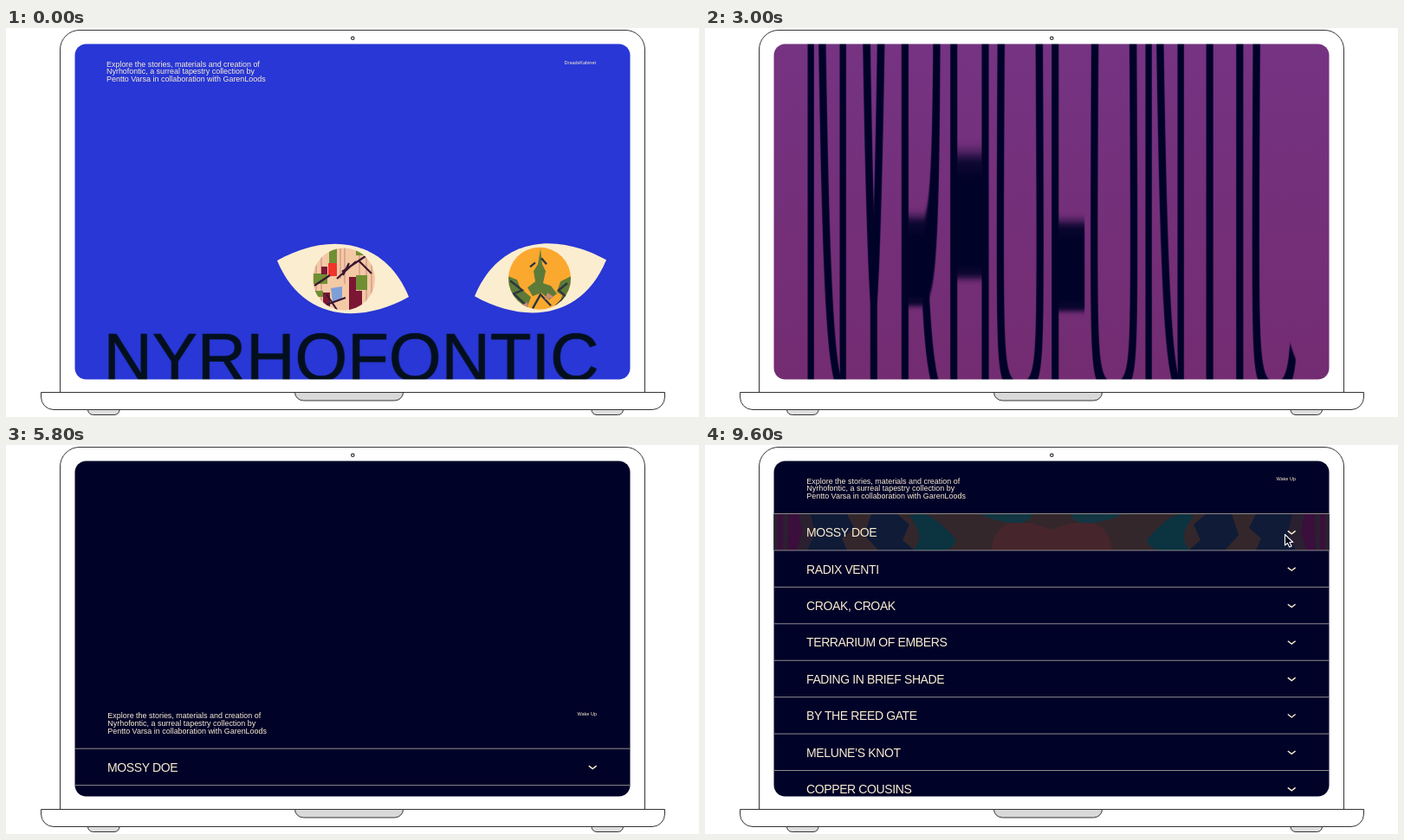
An HTML page with a canvas that plays this animation: 800x450 px, repeating every 9.7 s.

```html
<!DOCTYPE html>
<html lang="en">
<head>
<meta charset="utf-8">
<title>Nyrhofontic</title>
<style>
  html, body { margin: 0; width: 100%; height: 100%; overflow: hidden; background: #fff; }
  #stage { position: relative; width: 800px; height: 450px; overflow: hidden; }
  canvas { position: absolute; left: 79px; top: 18px; clip-path: inset(.5px round 13px); }
  svg { position: absolute; left: 0; top: 0; }
  text { font-family: "Liberation Sans", Arial, sans-serif; fill: #fbeed2; }
  .intro { font-size: 8.95px; }
  .tag { font-size: 5.5px; text-anchor: end; }
  .row text { font-size: 14px; letter-spacing: -.38px; }
  .row path { fill: none; stroke: #fbeed2; stroke-width: 1.4; }
  .rule { stroke: #8f8b8c; stroke-width: 1; }
  .frame { fill: none; stroke: #333; stroke-width: 1; }
</style>
</head>
<body>
<div id="stage">
  <canvas id="screen" width="642" height="389"></canvas>
  <svg width="800" height="450" viewBox="0 0 800 450">
    <defs>
      <clipPath id="view"><rect x="79.500" y="18.500" width="641" height="388" rx="13"/></clipPath>
      <clipPath id="lid"><path class="lid"/></clipPath>
      <clipPath id="iris"><circle cx="390" cy="290.5" r="36"/></clipPath>
    </defs>

    <g id="eyes">
      <g>
        <path class="lid" fill="#fbedd0"/>
        <g clip-path="url(#lid)"><g clip-path="url(#iris)">
          <rect x="350" y="250" width="80" height="80" fill="#f3c9a6"/>
          <path d="M358 250V330M364 250V330M386 250V290M391 250V296M408 250V330M416 250V330M422 250V330" stroke="#d59a86" stroke-width="1.4"/>
          <path d="M373 255h9v17h-9zM355 284h16v12h-16zM404 286h13v17h-13zM404 255h14v8h-14zM357 304h9v7h-9z" fill="#6f8f33"/>
          <path d="M372 272h10v15h-10z" fill="#f0352b"/>
          <path d="M396 288h8v38h-8zM404 304h7v20h-7zM364 276h7v9h-7zM366 306h8v20h-8z" fill="#7b1735"/>
          <path d="M375 301l13-2v14l-11 4z" fill="#7f9fd8"/>
          <path d="M356 298l18-12M382 290l22-20M388 282l33-22M396 272l-7 14M370 320l22-8M382 326l-12-18M408 270l14 14" stroke="#3a1730" stroke-width="2.2"/>
        </g></g>
      </g>
      <g transform="matrix(-1 0 0 1 1006 -.7)">
        <path class="lid" fill="#fbedd0"/>
        <g clip-path="url(#lid)"><g clip-path="url(#iris)">
          <rect x="350" y="250" width="80" height="80" fill="#fba82f"/>
          <path d="M389 256l3 18 5 8-2 12 9 7-6 10-10-4-9 8-9-7 7-9 9-3-3-14 4-8zM354 288l12 6 4 12-6 4 4 14-14 2zM426 288l-10 4-4 10-12 10 6 16 22-6z" fill="#5d7a38"/>
          <path d="M424 293l-14 11 10 4-13 12M358 296l10 8-8 7 13 13M377 322l12-13 9 16M382 274l6-7M395 272l6 5" fill="none" stroke="#2d3540" stroke-width="2.4"/>
          <path d="M373 312l8-5 3 8zM404 318l8 4-9 4z" fill="#c78a76"/>
        </g></g>
      </g>
    </g>

    <g id="head"></g>
    <g clip-path="url(#view)"><g id="list"></g></g>

    <g id="cursor">
      <path d="M0 0V12.5L3 10L5.2 14.6L7.6 13.5L5.4 9H9.2Z" fill="#05051a" stroke="#fff" stroke-width="1.1" stroke-linejoin="round"/>
    </g>

    <g class="frame">
      <path d="M62.500 421V25A22.500 22.500 0 0 1 85 2.500H715A22.500 22.500 0 0 1 737.500 25V421"/>
      <circle cx="400.300" cy="11.800" r="1.700" stroke-width="1.200"/>
      <path d="M40.500 421.500H760.500V427A14.500 14.500 0 0 1 746 441.500H55A14.500 14.500 0 0 1 40.500 427Z"/>
      <path d="M333.500 421.500H458.500A10 9.500 0 0 1 448.500 431H343.500A10 9.500 0 0 1 333.500 421.500Z" fill="#d9d9d9"/>
      <path id="foot" d="M94.500 441.500H131A6 6 0 0 1 125 447.500H100.500A6 6 0 0 1 94.500 441.500Z" fill="#dedede"/>
      <use href="#foot" x="581.500"/>
    </g>
  </svg>
</div>
<script>
const LOOP = 9700, W = 642, H = 389;
const $ = s => document.querySelector(s);
const clamp = (v, lo = 0, hi = 1) => Math.min(hi, Math.max(lo, v));
const span = (t, a, b) => clamp((t - a) / (b - a));
const smooth = p => p * p * (3 - 2 * p);
const mix = (a, b, p) => a + (b - a) * p;

// Rows are [time, ...values], blended linearly.
function sample(keys, t) {
  let i = 0;
  while (i < keys.length - 2 && t >= keys[i + 1][0]) i++;
  const a = keys[i], b = keys[i + 1], p = span(t, a[0], b[0]);
  return a.slice(1).map((v, j) => mix(v, b[j + 1], p));
}

// time, top colour, bottom colour, gradient length
const SKY = [
  [1000, 40, 55, 213, 40, 55, 213, 1],
  [2400, 71, 65, 200, 98, 57, 168, 1],
  [3600, 163, 37, 60, 132, 31, 58, 1],
  [4400, 21, 5, 45, 0, 2, 40, .66],
  [4700, 0, 2, 40, 0, 2, 40, .66]
];
const INK = [[0, 4, 15, 30], [1800, 0, 2, 40]];
// time, letter height seen at the top and bottom edge of the screen
const SPREAD = [[2400, -.5, 45.5], [3600, 38, 48.5], [4400, 51, 51.2]];

function makeCanvas(w, h) {
  const c = document.createElement('canvas');
  c.width = w;
  c.height = h;
  return c;
}

// The word, softened and enlarged vertically so it can be smeared row by row.
const PAD = 4, ROWS = 66, FINE = 16;
function makeWord() {
  const soft = makeCanvas(W * 4, ROWS * 4), s = soft.getContext('2d');
  s.scale(4, 4);
  s.filter = 'blur(1.2px)';
  s.font = '78px "Liberation Sans", Arial, sans-serif';
  s.fontKerning = 'none';
  s.lineJoin = 'round';
  s.lineWidth = .8;
  const y = PAD + 53.9;
  s.fillText('NYRHOFONTIC', 33.5, y);
  s.strokeText('NYRHOFONTIC', 33.5, y);
  const tall = makeCanvas(W * 2, ROWS * FINE), c = tall.getContext('2d');
  c.imageSmoothingQuality = 'high';
  c.drawImage(soft, 0, 0, tall.width, tall.height);
  return tall;
}

const word = makeWord();
const layer = makeCanvas(W, H), lc = layer.getContext('2d');
const ctx = $('#screen').getContext('2d');
const rgb = c => `rgb(${c.map(Math.round)})`;

// Returns a function from screen row to height inside the word.
function smear(t) {
  const p = span(t, 0, 2400), k = mix(.02, .94, p);
  const curve = q => Math.log(1 - k * q) / Math.log(1 - k);
  let a, b;
  if (p < 1) {
    const g = curve(mix(336, 10, p) / H);
    b = mix(53, 45.5, p);
    a = -b * g / (1 - g);
  } else {
    [a, b] = sample(SPREAD, t);
  }
  return y => mix(a, b, curve(y / H));
}

function drawScreen(t) {
  const c = sample(SKY, t), g = ctx.createLinearGradient(0, 0, 0, H * c[6]);
  g.addColorStop(0, rgb(c.slice(0, 3)));
  g.addColorStop(1, rgb(c.slice(3, 6)));
  ctx.fillStyle = g;
  ctx.fillRect(0, 0, W, H);
  if (t >= 4700) return;

  const at = smear(t);
  lc.globalCompositeOperation = 'source-over';
  lc.clearRect(0, 0, W, H);
  for (let y = 0; y < H; y++) {
    const u = at(y), sy = (u + PAD) * FINE;
    const sh = Math.max(1, (at(y + 1) - u) * FINE);
    if (sy < 0 || sy + sh > word.height) continue;
    lc.drawImage(word, 0, sy, word.width, sh, 0, y, W, 1);
  }
  lc.globalCompositeOperation = 'source-in';
  lc.fillStyle = rgb(sample(INK, t));
  lc.fillRect(0, 0, W, H);
  ctx.drawImage(layer, 0, 0);
}

// Leaf outline whose curves fall onto the line between its corners.
function lidPath(open) {
  const pt = (x, y) => `${x} ${mix(269 + (x - 313) * .276, y, open)}`;
  return `M313 269C${pt(372, 236)} ${pt(437, 243)} 465 311` +
         `C${pt(406, 344)} ${pt(341, 337)} 313 269Z`;
}

const INTRO = [
  'Explore the stories, materials and creation of',
  'Nyrhofontic, a surreal tapestry collection by',
  'Pentto Varsa in collaboration with GarenLoods'
];
const TITLES = [
  'MOSSY DOE', 'RADIX VENTI', 'CROAK, CROAK', 'TERRARIUM OF EMBERS',
  'FADING IN BRIEF SHADE', 'BY THE REED GATE', 'MELUNE’S KNOT', 'COPPER COUSINS'
];
const STEP = 42.43;

const header = (x, tag, tx, ty) =>
  INTRO.map((s, i) => `<text class="intro" x="${x}" y="${44.6 + i * 8.8}">${s}</text>`).join('') +
  `<text class="tag" x="${tx}" y="${ty}">${tag}</text>`;

const half = `
  <path d="M79 80H130V122H79Z" fill="#2a2030"/>
  <path d="M84 80h6v42h-6zM96 80h12l4 20-6 22h-11z" fill="#3a0f3c"/>
  <path d="M122 80h42l8 16-14 12 6 14h-46l9-20zM192 80h30l14 12-8 18 14 12h-42l-16-18z" fill="#101b37"/>
  <path d="M236 82q18-6 32 6t22 22q-2 10-16 12h-34q16-16-4-40z" fill="#0b3340"/>
  <path d="M330 122q4-30 26-32t44 8v24z" fill="#47252c"/>
  <path d="M318 80h60q-4 12-24 10t-36-10z" fill="#123742"/>`;

$('#head').innerHTML = header(116, 'DraadsKabinet', 681, 42.2);
$('#list').innerHTML =
  `<g id="hover"><path d="M79 80H721V122H79Z" fill="#33272c"/>${half}` +
  `<g transform="matrix(-1 0 0 1 800 0)">${half}</g></g>` +
  header(117.3, 'Wake Up', 682, 41.2) +
  TITLES.map((s, i) => `<g class="row" transform="translate(0 ${i * STEP})">
    <line class="rule" x1="79" x2="721" y1="79.500" y2="79.500"/>
    <text x="117" y="106.200">${s}</text>
    <path d="M672.800 99.400L677.200 102.800L681.600 99.400"/></g>`).join('');

const lids = document.querySelectorAll('.lid');
const eyes = $('#eyes'), head = $('#head'), list = $('#list');
const hover = $('#hover'), cursor = $('#cursor');

function render(t) {
  drawScreen(t);

  const open = 1 - smooth(span(t, 250, 1400));
  const d = lidPath(open);
  lids.forEach(l => l.setAttribute('d', d));
  eyes.style.display = open > 0 ? '' : 'none';
  head.style.opacity = 1 - span(t, 100, 950);

  const drop = Math.max(0, 149 - (t - 6700) * .1365);
  list.setAttribute('transform', `translate(0 ${drop})`);
  list.style.display = t > 5000 ? '' : 'none';

  const p = smooth(span(t, 9150, 9570));
  cursor.style.display = t >= 9150 ? '' : 'none';
  cursor.setAttribute('transform', `translate(${mix(625, 669.5, p)} ${mix(384, 103.5, p)})`);
  hover.style.opacity = span(t, 9450, 9580);
}

function tick() {
  render(performance.now() % LOOP);
  requestAnimationFrame(tick);
}
tick();
</script>
</body>
</html>
```
